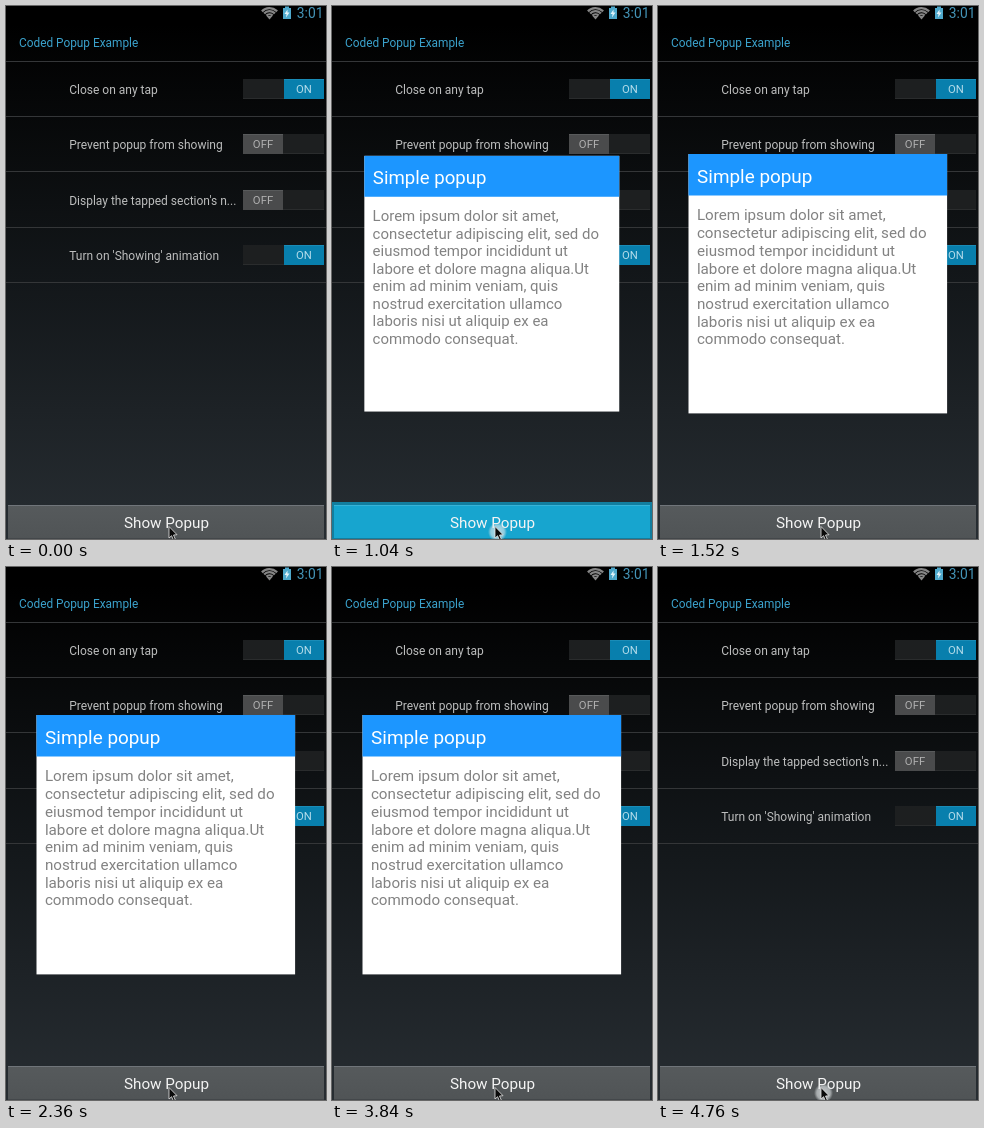
Recreate the animation shown at these times as an HTML page with a canvas. Size 320 px wide and 533 px high, loop 4800 ms.

```html
<!DOCTYPE html>
<html lang="en">
<head>
<meta charset="utf-8">
<title>Popup demo</title>
<style>
html, body { margin: 0; width: 100%; height: 100%; overflow: hidden; background: #000; }
canvas { display: block; }
</style>
</head>
<body>
<canvas id="stage" width="320" height="533"></canvas>
<script>
const c = document.getElementById('stage').getContext('2d');
const LOOP = 4800;
const PRESS = 880, BUTTON_ON = 920, SHOW = 1000, GROW = 120, RELEASE = 1120;
const PRESS_AGAIN = 4600, HIDE = 4680;
const LOREM = [
  'Lorem ipsum dolor sit amet,',
  'consectetur adipiscing elit, sed do',
  'eiusmod tempor incididunt ut',
  'labore et dolore magna aliqua.Ut',
  'enim ad minim veniam, quis',
  'nostrud exercitation ullamco',
  'laboris nisi ut aliquip ex ea',
  'commodo consequat.'
];
const ROWS = [
  ['Close on any tap', true],
  ['Prevent popup from showing', false],
  ["Display the tapped section's n...", false],
  ["Turn on 'Showing' animation", true]
];

function box(x, y, w, h, fill) {
  c.fillStyle = fill;
  c.fillRect(x, y, w, h);
}

function text(s, x, y, size, fill, align = 'left') {
  c.font = size + 'px Roboto, sans-serif';
  c.textAlign = align;
  c.fillStyle = fill;
  c.fillText(s, x, y);
}

function shape(points, fill) {
  c.beginPath();
  points.forEach(([x, y]) => c.lineTo(x, y));
  c.closePath();
  c.fillStyle = fill;
  c.fill();
}

function vertical(y0, y1, ...colors) {
  const g = c.createLinearGradient(0, y0, 0, y1);
  colors.forEach((color, i) => g.addColorStop(i / (colors.length - 1), color));
  return g;
}

function statusBar() {
  box(0, 0, 320, 18, '#000');
  c.strokeStyle = '#858585';
  c.lineWidth = 2.3;
  for (const r of [4.2, 7.3, 10.4]) {
    c.beginPath();
    c.arc(263.5, 12.5, r, -Math.PI * 0.76, -Math.PI * 0.24);
    c.stroke();
  }
  shape([[263.5, 13.5], [260.5, 10], [266.5, 10]], '#858585');
  box(279, 0.5, 4, 2, '#4fa9cc');
  box(277, 2, 8, 11, '#4fa9cc');
  shape([[281.5, 3.5], [278.5, 8], [280.5, 8], [280, 11.5], [283.5, 6.5], [281.5, 6.5]], '#e4f4fa');
  text('3:01', 290.8, 12, 13.8, '#4495b8');
}

function toggle(y, on) {
  box(237, y, 81, 20, '#1d1f20');
  box(237, y + 19, 81, 1, '#2a2c2d');
  const x = on ? 278 : 237;
  box(x, y, 40, 20, on ? '#087fad' : '#4a4b4c');
  box(x, y, 40, 1, on ? '#1a8cb7' : '#585a5b');
  text(on ? 'ON' : 'OFF', x + 20, y + 14.3, 11.3, on ? '#b4dcea' : '#b0b0b0', 'center');
}

function page() {
  box(0, 0, 320, 533, vertical(18, 533, '#000', '#13171a', '#272d32'));
  statusBar();
  text('Coded Popup Example', 13, 41, 11.85, '#3ba2cc');
  box(0, 55, 320, 1, '#343638');
  ROWS.forEach(([label, on], i) => {
    const y = 55 + i * 55.3;
    text(label, 63.2, Math.round(y + 33), 12, '#bdbebe');
    toggle(Math.round(y + 18), on);
    box(0, Math.round(y + 55), 320, 1, '#343638');
  });
}

function button(pressed) {
  if (pressed) {
    box(0, 496, 320, 37, '#127e9f');
    box(2, 499, 316, 33, '#17a5cf');
    box(2, 499, 316, 1, '#36b3d8');
  } else {
    box(2, 499, 316, 34, vertical(499, 533, '#565a5c', '#505456'));
    box(2, 499, 316, 1, '#70757a');
    box(2, 532, 316, 1, '#43474a');
  }
  text('Show Popup', 160.5, 522, 15.25, '#f4f4f4', 'center');
}

function popup(scale) {
  c.save();
  c.translate(159.8, 277.7);
  c.scale(scale, scale);
  c.translate(-159.8, -277.7);
  box(30.5, 148, 258.6, 259.4, '#fff');
  box(30.5, 148, 258.6, 41.5, '#1c96ff');
  text('Simple popup', 39.1, 176.8, 18.9, '#fff');
  LOREM.forEach((line, i) => text(line, 38.9, 214.4 + i * 17.72, 15.2, '#828282'));
  c.restore();
}

function pointer(touching) {
  if (touching) {
    const g = c.createRadialGradient(165.5, 526, 0, 165.5, 526, 9.5);
    g.addColorStop(0, 'rgba(235,240,242,.75)');
    g.addColorStop(0.7, 'rgba(225,230,232,.6)');
    g.addColorStop(1, 'rgba(225,230,232,0)');
    box(156, 516, 20, 17, g);
  }
  const arrow = [[163, 520.5], [163, 532], [165.6, 529.7], [167.4, 534],
                 [169.3, 533.2], [167.5, 529], [171, 528.7]];
  shape(arrow, '#0a0a0a');
  c.strokeStyle = '#e6e6e6';
  c.lineWidth = 0.8;
  c.stroke();
}

function draw(t) {
  const within = (a, b) => t >= a && t < b;
  page();
  button(within(BUTTON_ON, RELEASE));
  if (within(SHOW, HIDE)) {
    const left = 1 - Math.min(1, (t - SHOW) / GROW);
    popup(1 - 0.05 * left ** 3);
  }
  pointer(within(PRESS, RELEASE) || t >= PRESS_AGAIN);
}

const start = performance.now();
function tick() {
  draw((performance.now() - start) % LOOP);
  requestAnimationFrame(tick);
}
tick();
</script>
</body>
</html>
```
